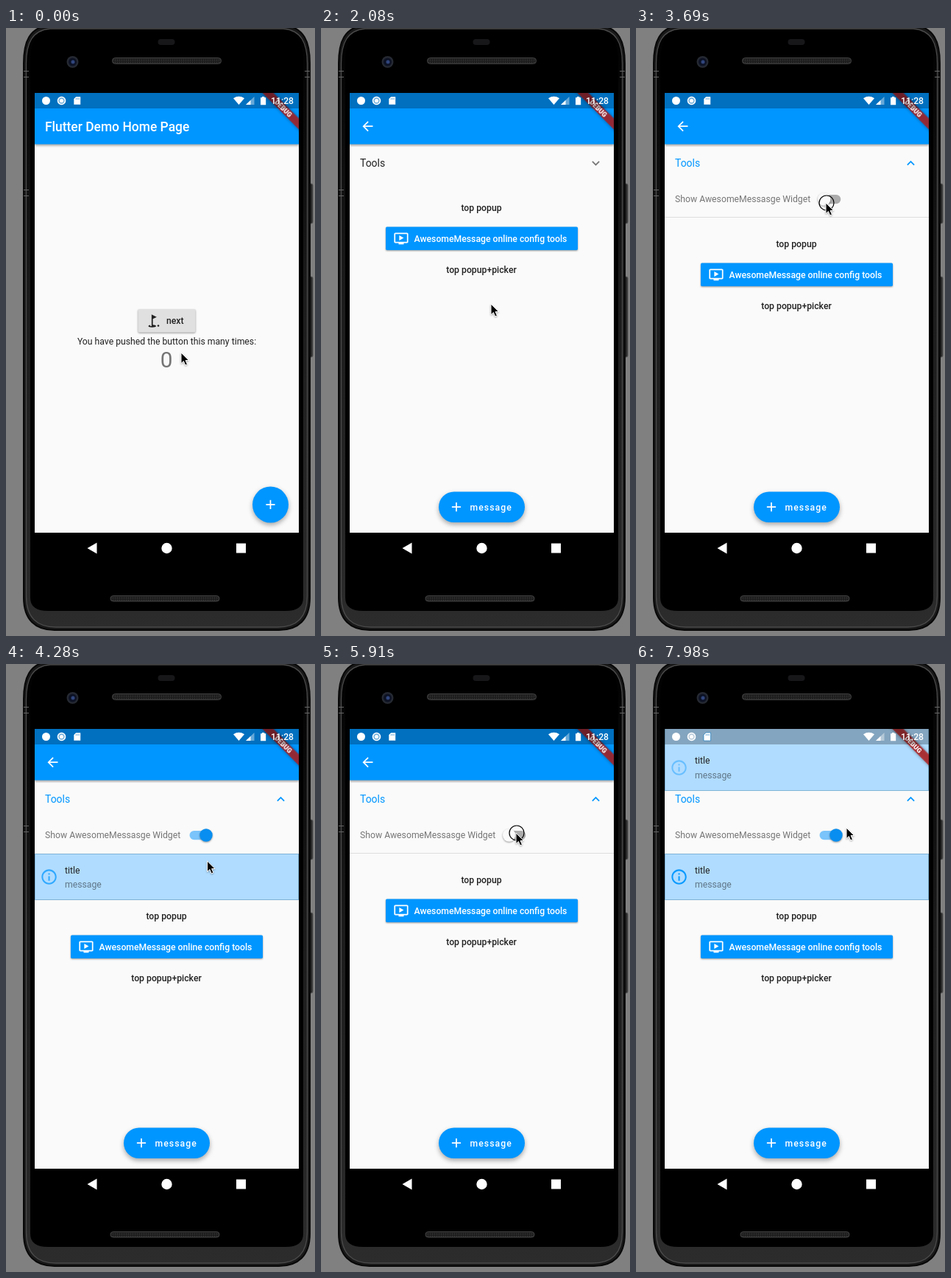
Recreate the animation shown at these times as an HTML page. Size 420 by 824 pixels, loop 8000 ms.

```html
<!DOCTYPE html>
<html lang="en">
<head>
<meta charset="utf-8">
<title>Flutter demo</title>
<style>
  html, body { margin: 0; width: 100%; height: 100%; overflow: hidden; background: #808080; }
  svg { display: block; width: 420px; height: 824px; }
  text { font: 12.22px Roboto, "Open Sans", sans-serif; }
  .med { font-weight: 500; }
  .mid { text-anchor: middle; }
  .white { fill: #fff; }
  .dark { fill: #212121; }
  .lift { filter: drop-shadow(0 1px 1px #0006); }
  .float { filter: drop-shadow(0 3px 3px #0005); }
</style>
</head>
<body>
<svg viewBox="0 0 420 824">
  <defs>
    <clipPath id="screen"><rect x="39" y="88" width="359" height="596"/></clipPath>
    <linearGradient id="chin" x2="0" y2="1">
      <stop offset="0"/><stop offset=".45" stop-color="#1c1c1c"/><stop offset="1" stop-color="#2c2c2c"/>
    </linearGradient>
    <pattern id="mesh" width="3" height="3" patternUnits="userSpaceOnUse">
      <rect width="3" height="3" fill="#1d1d1d"/><circle cx="1.5" cy="1.5" r=".8" fill="#3b3b3b"/>
    </pattern>
    <path id="add" d="M19 13h-6v6h-2v-6H5v-2h6V5h2v6h6v2z"/>
    <path id="info" d="M11 17h2v-6h-2v6zm1-15C6.48 2 2 6.48 2 12s4.48 10 10 10 10-4.48 10-10S17.52 2 12 2zm0 18c-4.41 0-8-3.59-8-8s3.59-8 8-8 8 3.59 8 8-3.59 8-8 8zM11 9h2V7h-2v2z"/>
    <g id="words">
      <text class="dark" x="80" y="283.5">title</text>
      <text fill="#5f7686" x="80" y="302.7">message</text>
    </g>
  </defs>

  <!-- phone -->
  <rect x="411" y="211" width="6" height="54" rx="2" fill="#2a2a2a" stroke="#555"/>
  <rect x="411" y="337" width="6" height="109" rx="2" fill="#2a2a2a" stroke="#555"/>
  <path d="M24 48C24 18 32 0 58 -4H379C405 0 413 18 413 48V772C413 802 397 816 371 816H66C40 816 24 802 24 772Z" fill="#191919" stroke="#080808" stroke-width="2"/>
  <path d="M27.5 48C27.5 20 36 3 60 1H377C401 3 409.5 20 409.5 48V770C409.5 799 395 812 369 812H68C42 812 27.5 799 27.5 770Z" fill="url(#chin)" stroke="#4b4b4b" stroke-width="1.3"/>
  <path d="M33 48C33 22 40 6 62 4H375C397 6 404 22 404 48V772C404 784 396 790 380 790H57C41 790 33 784 33 772Z"/>
  <path d="M24 58.5h7m-7 8h7m-7 153h7m-7 8h7M406 58.5h7m-7 8h7" stroke="#666"/>
  <rect x="206.500" y="15" width="23" height="8" rx="4" fill="#17171a"/>
  <circle cx="90.500" cy="46" r="8" fill="#252932"/>
  <circle cx="90.500" cy="46" r="5.500" fill="#0d1224"/>
  <circle cx="91" cy="46" r="2.500" fill="#30457c"/>
  <rect x="144.500" y="40.500" width="148" height="8" rx="4" fill="url(#mesh)" stroke="#444"/>
  <rect x="142" y="769.500" width="148" height="7.500" rx="3.700" fill="url(#mesh)" stroke="#444"/>
  <g class="white">
    <path d="M110.500 705L123.500 697.500V712.500Z"/>
    <circle cx="218.500" cy="705" r="7.200"/>
    <rect x="313" y="698.500" width="13" height="13"/>
  </g>

  <g clip-path="url(#screen)">
    <rect x="39" y="88" width="359" height="596" fill="#fafafa"/>
    <rect x="39" y="88" width="359" height="69.500" fill="#0096ff" style="filter:drop-shadow(0 2px 1.500px #0005)"/>

    <g id="home">
      <text class="med white" x="53" y="140" style="font-size:17.45px">Flutter Demo Home Page</text>
      <rect id="next" class="lift" x="179.500" y="381" width="78" height="31.500" rx="1.700"/>
      <g transform="translate(190 386.500) scale(.8727)" class="dark">
        <circle cx="19.500" cy="19.500" r="1.500"/>
        <path d="M17 5.920L9 2v18H7v-1.730c-1.790.350-3 .990-3 1.730 0 1.100 2.690 2 6 2s6-.900 6-2c0-.990-2.160-1.810-5-1.970V8.980l6-3.060z"/>
      </g>
      <text class="med dark" x="218" y="401">next</text>
      <text class="dark mid" x="218.500" y="429">You have pushed the button this many times:</text>
      <text class="mid" x="218" y="460" fill="#757575" style="font-size:29.7px">0</text>
    </g>

    <g id="tools">
      <rect x="39" y="161" width="359" height="520" fill="#fafafa"/>
      <path class="white" transform="translate(53 122.700) scale(.8727)" d="M20 11H7.830l5.590-5.590L12 4l-8 8 8 8 1.410-1.410L7.830 13H20v-2z"/>
      <rect id="press" x="39" y="159" width="359" height="49" opacity=".06"/>
      <text id="head" x="53" y="188" style="font-size:13.96px">Tools</text>
      <path id="chevron" d="M16.590 8.590L12 13.170 7.410 8.590 6 10l6 6 6-6z"/>
      <g id="panel">
        <text x="53" y="236.300" fill="#757575">Show AwesomeMessasge Widget</text>
        <rect id="track" x="249.500" y="226" width="28.800" height="12.200" rx="6.100"/>
        <circle id="thumb" class="lift" cy="232" r="8.700"/>
        <path id="divider" d="M39 256.500H398" stroke="#dedede"/>
      </g>
      <g id="banner">
        <rect x="39.500" y="257.500" width="358" height="62" fill="#b0dcff" stroke="#7fb3d6"/>
        <use id="pulse" href="#info" fill="#0096ff" transform="translate(46.300 276.300) scale(1.020)"/>
        <use href="#words"/>
      </g>
      <g id="list">
        <text class="med dark mid" x="218" y="247.800">top popup</text>
        <rect class="lift" x="88" y="269.500" width="261" height="31.500" rx="1.700" fill="#0096ff"/>
        <path class="white" transform="translate(98.500 274.800) scale(.8727)" d="M21 3H3c-1.110 0-2 .890-2 2v12c0 1.100.890 2 2 2h5v2h8v-2h5c1.100 0 1.990-.900 1.990-2L23 5c0-1.110-.900-2-2-2zm0 14H3V5h18v12zm-5-6l-7 4V7z"/>
        <text class="med white" x="126.500" y="289.500">AwesomeMessage online config tools</text>
        <text class="med dark mid" x="218" y="331.500">top popup+picker</text>
      </g>
    </g>

    <g id="fab">
      <rect id="pill" class="float"/>
      <use id="plus" class="white" href="#add"/>
      <text id="label" class="med white" x="202.500" y="654" letter-spacing="1.050">message</text>
    </g>

    <g id="popup">
      <rect x="39.500" y="235" width="358" height="84.500" fill="#b0dcff" stroke="#7fb3d6"/>
      <use id="popPulse" href="#info" fill="#0096ff" transform="translate(46.300 276.300) scale(1.020)"/>
      <use href="#words"/>
    </g>

    <g transform="translate(398 88) rotate(45)">
      <rect x="-60" y="24.400" width="120" height="10.500" fill="#b71c1c" fill-opacity=".8" style="filter:drop-shadow(0 0 2px #0008)"/>
      <text class="white mid" y="32.900" style="font-size:8.9px;font-weight:900">DEBUG</text>
    </g>

    <!-- status bar -->
    <rect x="39" y="88" width="359" height="21" opacity=".25"/>
    <g class="white">
      <circle cx="54.500" cy="98.500" r="5.500"/>
      <circle cx="75.500" cy="98.500" r="5" fill="#fff" fill-opacity=".45" stroke="#fff" stroke-width="1.600"/>
      <circle cx="75.500" cy="98.500" r="2.600"/>
      <path d="M95 93H101.500V104H92V96ZM95.200 95v2m2-2v2m2-2v2" stroke="#0070bf" stroke-width=".6"/>
      <path d="M316.500 104L309 95.200Q316.500 90.500 324 95.200Z"/>
      <path d="M326 104H337.500V93Z" opacity=".4"/>
      <path d="M326 104H332.500V97.800Z"/>
      <path d="M346 94.200h2V93h3.200v1.200h2V104.300H346Z"/>
      <text class="med" x="360" y="103">11:28</text>
    </g>
  </g>

  <circle id="click" r="10" fill="none" stroke="#000" stroke-width="1.200"/>
  <path id="cursor" d="M0 0V14.600L3.400 11.500L5.700 17L8.400 15.800L6.100 10.500H10.600Z" stroke="#fff" stroke-width="1" style="filter:drop-shadow(0 1px 1px #0005)"/>
</svg>

<script>
const LOOP = 8000, FIRST = 136, STEP = 147.9;
const el = {};
document.querySelectorAll('[id]').forEach(e => el[e.id] = e);

// cursor path: step, x, y
const path = [
  [0, 238, 440], [2, 237, 430], [5, 230, 396], [11, 230, 396], [14, 231, 374],
  [16, 256, 300], [19, 309, 176], [21, 309, 176], [25, 258, 237], [27, 258, 237],
  [31, 289, 297], [34, 266, 226], [36, 265, 229], [41, 265, 229], [43, 212, 582],
  [45, 180, 633], [47, 179, 635], [51, 179, 635], [52, 192, 585], [54, 286, 222]
];
const clicks = [6, 20, 25, 37, 40, 46];
const toggle = { 26: .6, 38: .4, 39: 0, 40: 0, 41: .6 };

const mix = (a, b, p) => a + (b - a) * p;
const clamp = v => Math.max(0, Math.min(1, v));
const between = (v, a, b) => v >= a && v <= b;
const set = (e, attrs) => { for (const k in attrs) e.setAttribute(k, attrs[k]); };
const show = (e, on) => set(e, { visibility: on ? 'visible' : 'hidden' });
const blink = ms => 1 - .6 * (1 - Math.abs(1 - Math.max(0, ms) / 1000 % 2));

function pointer(i) {
  const n = Math.max(1, path.findIndex(k => k[0] >= i));
  const [a, ax, ay] = path[n - 1], [b, bx, by] = path[n];
  const p = (i - a) / (b - a);
  return [mix(ax, bx, p), mix(ay, by, p)];
}

function drawFab(p, pressed) {
  const x = mix(335, 160, p), y = mix(621.5, 628.5, p);
  const w = mix(49, 117, p), h = mix(49, 41.5, p);
  set(el.pill, { x, y, width: w, height: h, rx: h / 2, fill: pressed ? '#22a4ff' : '#0096ff' });
  set(el.plus, { transform: `translate(${x + mix(14, 13.5, p)} ${y + h / 2 - 10.5}) scale(.8727)` });
  set(el.label, { opacity: p < 1 ? 0 : 1 });
}

function render(t) {
  const i = t < FIRST ? 0 : Math.floor((t - FIRST) / STEP) + 1;
  const now = FIRST + (i - 1) * STEP;

  const page = clamp((i - 8) / 2);
  set(el.tools, { opacity: page });
  set(el.home, { opacity: 1 - page });
  set(el.next, { fill: between(i, 6, 9) ? '#c9c9c9' : '#e0e0e0' });
  drawFab(page, between(i, 46, 47));

  const open = clamp((i - 20) / 2);
  const tint = open > 0 ? '#0096ff' : '#212121';
  show(el.press, between(i, 20, 21));
  set(el.head, { fill: tint });
  set(el.chevron, {
    fill: open > 0 ? tint : '#757575',
    transform: `translate(373.5 183.2) rotate(${180 * open}) scale(.8727) translate(-12 -12)`
  });
  set(el.panel, { opacity: open });

  const on = toggle[i] ?? (i > 26 ? 1 : 0);
  set(el.track, { fill: on > .5 ? '#7ac4fb' : '#acacac' });
  set(el.thumb, { cx: mix(255.7, 272, on), fill: on > .5 ? '#088ef0' : '#fafafa' });

  const shown = between(i, 26, 37) || i >= 41;
  show(el.banner, shown);
  show(el.divider, !shown);
  set(el.pulse, { opacity: blink(now - (i < 41 ? 3833 : 6052)) });
  set(el.list, { transform: `translate(0 ${49 * open + (shown ? 49 : 0)})` });

  const drop = clamp((now - 6985) / 1000);
  const ease = Math.sqrt(1 - (1 - drop) ** 2);
  show(el.popup, drop > 0);
  set(el.popup, { transform: `translate(0 ${-148 - 83 * (1 - ease)})` });
  set(el.popPulse, { opacity: blink(now - 6985) });

  const [x, y] = pointer(i);
  set(el.cursor, { transform: `translate(${x} ${y})` });
  set(el.click, { cx: x + 1, cy: y });
  show(el.click, clicks.includes(i));
}

function tick() {
  render(performance.now() % LOOP);
  requestAnimationFrame(tick);
}
tick();
</script>
</body>
</html>
```
